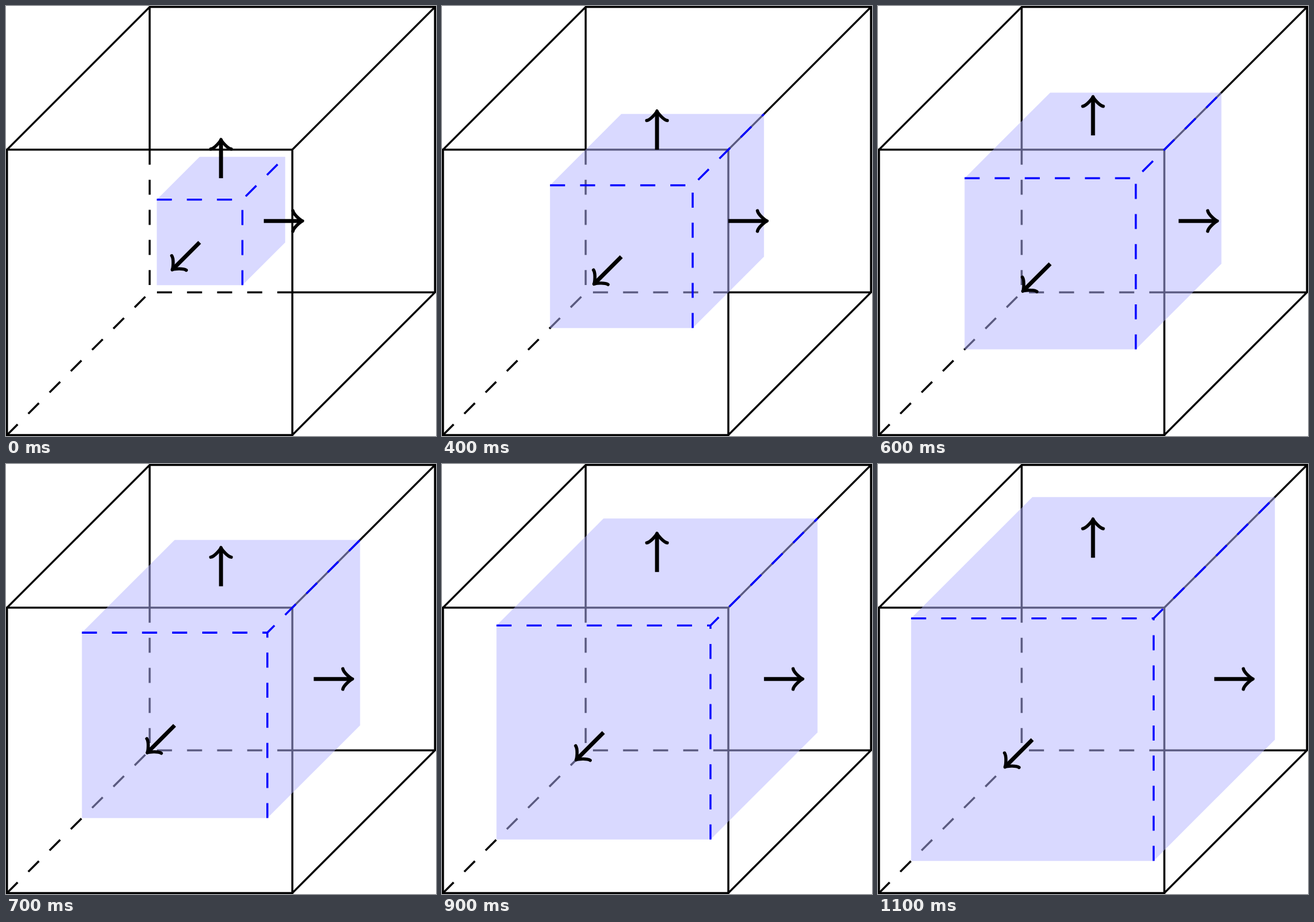
Write an HTML page that moves like this. It is 712 px wide and 712 px high and loops after 1200 ms.

```html
<!DOCTYPE html>
<html lang="en">
<head>
<meta charset="utf-8">
<title>Expanding cube</title>
<style>
  html, body { margin: 0; width: 100%; height: 100%; overflow: hidden; background: #fff; }
  svg { display: block; width: 100%; height: 100%; }
  path { fill: none; stroke: #000; stroke-width: 3.32; }
  .dash { stroke-dasharray: 24.907; }
  .blue { stroke: #00f; }
  #body { fill: #b3b3ff; fill-opacity: .5; stroke: none; }
  .shaft { stroke-width: 6.64; }
  .head { stroke-width: 5.31; stroke-linecap: round; stroke-linejoin: round; }
</style>
</head>
<body>
<svg viewBox="0 0 712 712">
  <defs>
    <!-- Points right, starting at the origin -->
    <g id="arrow">
      <path class="shaft" d="M0 0H61.5"/>
      <path class="head" d="M48.2 -17C49.3 -10.6 61 -1.06 64.15 0C61 1.06 49.3 10.6 48.2 17"/>
    </g>
  </defs>
  <path id="frame"/>
  <path id="hidden" class="dash"/>
  <path id="body"/>
  <path id="edges" class="dash blue"/>
  <use id="up" href="#arrow"/>
  <use id="right" href="#arrow"/>
  <use id="front" href="#arrow"/>
</svg>
<script>
  const MID = 356, UNIT = 118.11;
  const STEP = 100, STEPS = 12;
  const get = id => document.getElementById(id);

  // Marks of a cube at a given scale: outer and inner offsets on both sides of the middle
  const marks = scale => [-3, -1, 1, 3].map(k => +(MID + k * UNIT * scale).toFixed(2));

  function drawFrame() {
    const [a, b, c, d] = marks(1);
    get('frame').setAttribute('d',
      `M${a} ${b}H${c}V${d}H${a}Z M${a} ${b}L${b} ${a}H${d}V${c}L${c} ${d}` +
      `M${c} ${b}L${d} ${a}M${b} ${a}V${b}M${c} ${c}H${d}`);
    get('hidden').setAttribute('d',
      `M${b} ${b}V${c}M${c} ${c}H${b}M${a} ${d}L${b} ${c}`);
  }

  function place(id, x, y, angle) {
    get(id).setAttribute('transform', `translate(${x} ${y}) rotate(${angle})`);
  }

  function drawInner(scale) {
    const [a, b, c, d] = marks(scale);
    get('body').setAttribute('d', `M${a} ${b}L${b} ${a}H${d}V${c}L${c} ${d}H${a}Z`);
    get('edges').setAttribute('d', `M${a} ${b}H${c}L${d} ${a}M${c} ${d}V${b}`);
    const off = 2 * UNIT * scale;
    place('up', MID, MID - off, -90);
    place('right', MID + off, MID, 0);
    place('front', b, c, 135);
  }

  let shown = -1;
  function tick() {
    const step = Math.floor(performance.now() / STEP) % STEPS;
    if (step !== shown) {
      shown = step;
      drawInner(0.3 + 0.05 * step);
    }
    requestAnimationFrame(tick);
  }

  drawFrame();
  tick();
</script>
</body>
</html>
```
